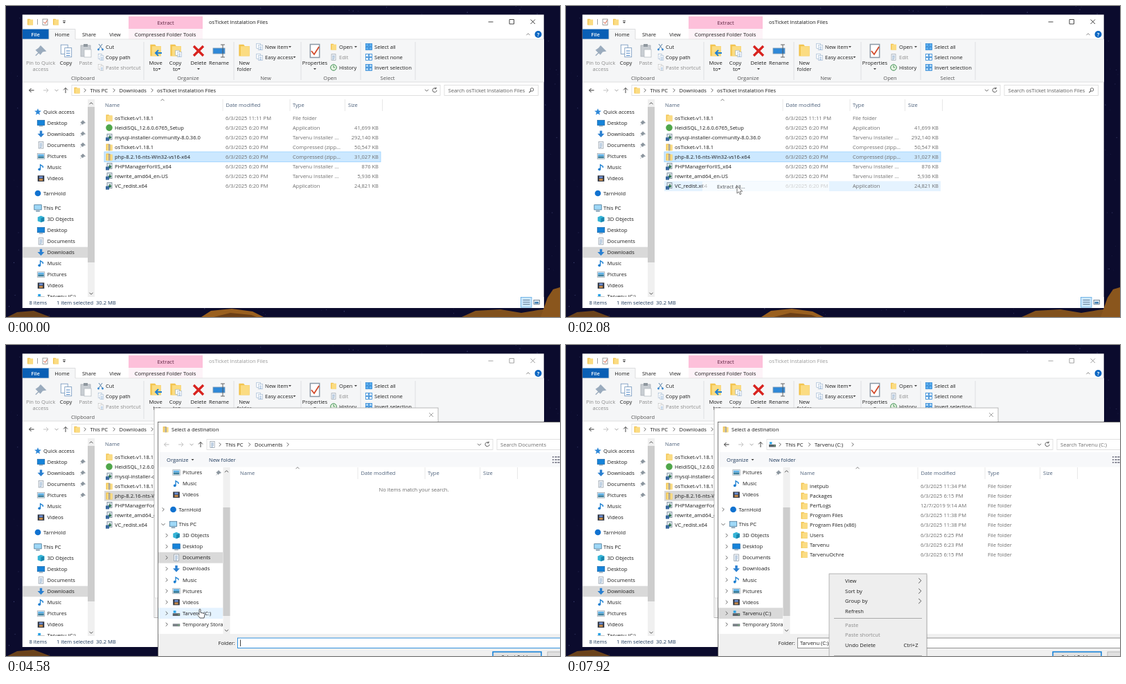
These frames come from a looping animation (800x450 px, 8 s). An HTML page:

```html
<!DOCTYPE html>
<html lang="en">
<head>
<meta charset="utf-8">
<title>Extracting a zip folder</title>
<style>
html, body { margin: 0; width: 100%; height: 100%; overflow: hidden; background: #0b0b2d; }
svg { display: block; width: 100vw; height: 100vh; font: 7.55px "Open Sans", "Noto Sans", sans-serif; }
</style>
</head>
<body>
<svg id="stage" viewBox="0 0 800 450"></svg>
<script>
const INK = '#1c1c1c', GREY = '#6d6d6d', BLUE = '#0078d7', LINE = '#d9d9d9';
const MID = 'text-anchor="middle"', END = 'text-anchor="end"';
const rowStep = 14.1;

// Drawing helpers: text is centred on y
const T = (x, y, s, fill = INK, more = '') => `<text x="${x}" y="${y + 2.6}" fill="${fill}" ${more}>${s}</text>`;
const R = (x, y, w, h, fill, stroke = 'none', more = '') =>
  `<rect x="${x}" y="${y}" width="${w}" height="${h}" fill="${fill}" stroke="${stroke}" stroke-width=".8" ${more}/>`;
const P = (d, stroke, fill = 'none', w = 0.9) => `<path d="${d}" stroke="${stroke}" fill="${fill}" stroke-width="${w}"/>`;
const C = (x, y, r, fill, more = '') => `<circle cx="${x}" cy="${y}" r="${r}" fill="${fill}" ${more}/>`;
const G = (id, s) => `<g id="${id}">${s}</g>`;
const at = (x, y, s, k = 1) => `<g transform="translate(${x} ${y}) scale(${k})">${s}</g>`;
const right = (x, y, c = '#555', k = 1) => P(`M${x - 1.3 * k} ${y - 2.6 * k}l${2.6 * k} ${2.6 * k}l${-2.6 * k} ${2.6 * k}`, c);
const down = (x, y, c = '#555') => P(`M${x - 2.5} ${y - 1.2}l2.5 2.5l2.5 -2.5`, c);
const up = (x, y, c = '#777') => P(`M${x - 2.5} ${y + 1.2}l2.5 -2.5l2.5 2.5`, c);
const tri = (x, y, c = '#444') => P(`M${x - 2} ${y - 1}h4l-2 2.2z`, 'none', c);
const cross = (x, y, id) => `<path id="${id}" d="M${x - 3} ${y - 3}l6 6m0 -6l-6 6" stroke="#333" stroke-width=".9"/>`;

const page = R(-3.5, -5, 7, 10, '#fff', '#8b98a5');
const folder = P('M-4.5 -4.8h4l1 1.2h4v8.6h-9z', 'none', '#f2c44f') + R(-3, -3.4, 7.4, 8.2, '#fbdc82');
const note = P('M-1 3V-4l4 2.5v2', '#1b7fd1', 'none', 1.4) + C(-2.4, 3, 2, '#1b7fd1');
const icon = {
  folder,
  zip: folder + R(-1, -4.5, 2.4, 9.5, '#8d8a80') + P('M.2 -4v9', '#eee', 'none', .6),
  desk: R(-5.5, -4, 11, 7.5, '#1684da', '#0f62a8') + P('M-3 5h6', '#5a7388'),
  down: P('M-1.8 -5h3.6v4.5h3.4L0 5l-5.2 -5.5h3.4z', 'none', '#2a7fd0'),
  doc: page + P('M-2 -2.5h4m-4 2h4m-4 2h4m-4 2h3', '#5c87b5', 'none', .8),
  pic: R(-5.5, -4, 11, 8, '#fff', '#9aa4ad') + R(-4.5, -3, 9, 3, '#5fb2e8') + R(-4.5, 0, 9, 3, '#3c7f9c'),
  music: note,
  video: R(-5, -4.5, 10, 9, '#2e3440') + R(-2.8, -3.4, 5.6, 3, '#6d8fd1') + R(-2.8, .4, 5.6, 3, '#c98d4b'),
  cube: P('M0 -5l5 2v6l-5 2l-5 -2v-6z', 'none', '#35b4d6') + P('M0 -1l5 -2v6l-5 2z', 'none', '#1a86ae'),
  pc: R(-5.5, -4.5, 11, 7.5, '#9fd8f7', '#3c6e91') + P('M-3 5h6', '#44708f', 'none', 1.2),
  drive: R(-5.5, 0, 11, 4, '#5b6268') + R(-4.5, -4, 4, 3.4, '#28a3e6') + R(2.5, 1.5, 2, 1, '#7be07b'),
  disk: R(-5.5, -1, 11, 4, '#7a8187') + R(2.5, .5, 2, 1, '#7be07b'),
  blob: C(0, 0, 4.6, '#1172d0'),
  green: C(0, 0, 4.8, '#4fa64a'),
  star: P('M0 -5l1.4 3.5l3.8 .2l-3 2.4l1 3.7L0 2.8l-3.2 2l1 -3.7l-3 -2.4l3.8 -.2z', 'none', '#2f88d8'),
  msi: R(-3, -5, 7, 8, '#dfe7ee', '#6f8290') + P('M1 -3v4m-2 -1.6l2 2l2 -2', '#1d6a3c', 'none', 1.4) + R(-5, 0, 5, 5, '#3b6aa0')
};
const I = (name, x, y, k = 1) => at(x, y, icon[name], k);
const pin = (x, y, k = 1, c = '#8b959e') => at(x, y, P('M0 -3.5l3.5 3.5l-2.2 .4l-1.5 2l-3 -3l2 -1.4zM-1.4 1.2l-2.2 2.2', c, c, .7), k);

// Parts shared by the main window and the folder picker
const navItem = (x, y, [name, ic, top]) => I(ic, x + (top ? 46 : 50.5), y, .95) + T(x + (top ? 54 : 59.5), y, name);
const navTools = (x, y, end, id) =>
  `<path id="${id}" d="M${x + 40.5} ${y}h-7m3 -3l-3 3l3 3" stroke="#333" fill="none"/>` +
  P(`M${x + 54} ${y}h7m-3 -3l3 3l-3 3`, '#bbb') + down(x + 73, y, '#999') +
  P(`M${x + 86} ${y + 4}v-7.5m-3 3l3 -3l3 3`, '#333') + R(x + 95, y - 7.5, end - x - 95, 15, '#fff', LINE) +
  down(end - 19.5, y) + P(`M${end - 6} ${y - 2.5}a3 3 0 1 0 1 2.5m-1 -4.5v2.3h-2.2`, '#444');
const heads = (x, y) =>
  [[143, 'Name'], [317.5, 'Date modified'], [414, 'Type'], [494, 'Size']].map(([a, s]) => T(x + a, y, s, '#4c607a')).join('') +
  [313, 410, 489.5, 543.5].map(a => P(`M${x + a} ${y - 8}v17`, '#e3e3e3', 'none', .8)).join('') + up(x + 226, y - 7);
const fileRow = (x, y, [name, ic, date, type, size = '']) =>
  I(ic, x + 149, y) + T(x + 157, y, name) + T(x + 317, y, date, GREY) + T(x + 414, y, type, GREY) + T(x + 538, y, size, GREY, END);
const button = (x, y, w, h, s, main) =>
  R(x, y, w, h, '#e1e1e1', main ? BLUE : '#adadad', main ? 'style="stroke-width:1.4"' : '') + T(x + w / 2, y + h / 2, s, INK, MID);
const scroll = (x, y0, y1, t0, t1) =>
  R(x, y0, 10, y1 - y0, '#f0f0f0') + R(x, t0, 10, t1 - t0, '#cdcdcd') + up(x + 5, y0 + 6, '#444') + down(x + 5, y1 - 5, '#444');
const menu = (x, y, w, hoverId, items, seps) =>
  R(x + 1, y + 2, w, 260, '#000', 'none', 'opacity=".1"') + R(x, y, w, 260, '#eee', '#a3a3a3') +
  R(x + 2, 0, w - 4, 14.6, '#f6f6f6', 'none', `id="${hoverId}"`) +
  items.map(([s, iy, arrow, c, more]) => T(x + 23, iy, s, c, more) + (arrow ? right(x + w - 10, iy, '#444', 1.4) : '')).join('') +
  seps.map(sy => P(`M${x + 7} ${sy}h${w - 14}`, '#989898', 'none', .8)).join('');

const ctxItems = [
  ['Open', 227.5, 0, INK, 'font-weight="700"'], ['Open in new window', 242], ['Extract All...', 261.5], ['Pin to Start', 276],
  ['Scan with Northgate Sentinel...', 291], ['Share', 305.5], ['Open with...', 320.5], ['Give access to', 340, 1],
  ['Restore previous versions', 354.5], ['Send to', 374, 1], ['Cut', 393.5], ['Copy', 408], ['Create shortcut', 427.5], ['Delete', 442]];
const viewItems = [
  ['View', 341, 1], ['Sort by', 356, 1], ['Group by', 370.5, 1], ['Refresh', 385.5], ['Paste', 405, 0, '#8a8a8a'],
  ['Paste shortcut', 419.5, 0, '#8a8a8a'], ['Undo Delete', 434]];
const eve = '6/3/2025 6:20 PM', wrap = 'Tarvenu Installer ...', zipped = 'Compressed (zipp...';
const files = [
  ['osTicket-v1.18.1', 'folder', '6/3/2025 11:11 PM', 'File folder'],
  ['HeidiSQL_12.6.0.6765_Setup', 'green', eve, 'Application', '41,699 KB'],
  ['mysql-installer-community-8.0.36.0', 'msi', eve, wrap, '292,140 KB'],
  ['osTicket-v1.18.1', 'zip', eve, zipped, '50,547 KB'],
  ['php-8.2.16-nts-Win32-vs16-x64', 'zip', eve, zipped, '31,027 KB'],
  ['PHPManagerForIIS_x64', 'msi', eve, wrap, '876 KB'],
  ['rewrite_amd64_en-US', 'msi', eve, wrap, '5,936 KB'],
  ['VC_redist.x64', 'msi', eve, 'Application', '24,821 KB']];
const driveFiles = [
  ['inetpub', '6/3/2025 11:34 PM'], ['Packages', '6/3/2025 6:15 PM'], ['PerfLogs', '12/7/2019 9:14 AM'],
  ['Program Files', '6/3/2025 11:38 PM'], ['Program Files (x86)', '6/3/2025 11:38 PM'], ['Users', '6/3/2025 6:25 PM'],
  ['Tarvenu', '6/3/2025 6:23 PM'], ['TarvenuOchre', '6/3/2025 6:15 PM']];
const rowYs = y0 => files.map((_, i) => y0 + i * rowStep);
const quick = [['Desktop', 'desk'], ['Downloads', 'down'], ['Documents', 'doc'], ['Pictures', 'pic'], ['Music', 'music'], ['Videos', 'video']];
const cloud = ['TarnHold', 'blob', 1], pc = ['This PC', 'pc', 1];
const places = [['3D Objects', 'cube'], ['Desktop', 'desk'], ['Documents', 'doc'], ['Downloads', 'down'], ['Music', 'music'],
  ['Pictures', 'pic'], ['Videos', 'video'], ['Tarvenu (C:)', 'drive']];
const placeYs = [...places, 0].map((_, i) => 275.5 + i * 16.1);

function backdrop() {
  let seed = 7, s = R(0, 0, 800, 450, '#0b0b2d');
  const rnd = () => (seed = seed * 16807 % 2147483647) / 2147483647;
  for (let i = 0; i < 700; i++)
    s += C((rnd() * 800).toFixed(1), (rnd() * 450).toFixed(1), (.25 + rnd() * .45).toFixed(2), '#7f88c4', `opacity="${(.15 + rnd() * .5).toFixed(2)}"`);
  return s + P('M2 450l14 -7l24 -2l24 9z', 'none', '#6b431b') +
    P('M282 450l14 -9l30 -3l30 4l16 8z', 'none', '#9a601f') + P('M300 450l24 -6l30 3l8 3z', 'none', '#6b3f16') +
    P('M658 450l20 -9l36 -2l30 5l24 -4l32 -4v14z', 'none', '#80501c') +
    P('M772 450l10 -28l8 -12l10 -3v43z', 'none', '#8a561d');
}

function ribbon() {
  const big = (x, a, b = '', c = INK) => T(x, 82, a, c, MID) + T(x, 91, b, c, MID);
  const small = (x, y, s, c = INK) => T(x, y, s, c);
  const sheets = (x, y, k, c = '#7a9cc0') => at(x, y, R(-7, -8, 9, 12, '#fff', c) + R(-2, -4, 9, 12, '#fff', c) + P('M0 0h5m-5 3h5m-5 3h5', '#4b84c4'), k);
  const grid = (y, c) => [0, 5].map(a => [0, 5].map(b => R(519.5 + a, y - 4.5 + b, 4, 4, c, '#2b86d6')).join('')).join('');
  return R(24, 48, 753, 62, '#f5f6f7') + P('M24 110h753', '#dadbdc') + P('M24 48h38m38 0h677', '#dadbdc', 'none', .7) +
    [199, 329, 426, 512, 591].map(x => P(`M${x} 52v55`, '#dcdddf')).join('') +
    [[111, 'Clipboard'], [263, 'Organize'], [375, 'New'], [468, 'Open'], [551, 'Select']].map(([x, s]) => T(x, 104, s, '#555', MID)).join('') +
    pin(50, 65, 2, '#9aabbd') + big(50, 'Pin to Quick', 'access', '#8b8b8b') +
    sheets(87, 65, 1.1) + big(86.5, 'Copy') +
    R(108, 57, 14, 16, '#c9ced3', '#a7adb3') + R(112, 55, 6, 4, '#8f989f') + R(113, 63, 10, 11, '#fff', '#b5bbc1') + big(115, 'Paste', '', '#8b8b8b') +
    P('M134 55l5 7m0 -7l-5 7', '#49759f') + C(133.5, 63, 1.4, '#2d83cf') + C(139.5, 63, 1.4, '#2d83cf') + small(144, 59, 'Cut') +
    sheets(137, 74, .55) + small(144, 74, 'Copy path') + sheets(137, 89, .55, '#aaa') + small(144, 89, 'Paste shortcut', '#8b8b8b') +
    I('folder', 216, 64, 1.7) + at(220, 68, P('M5 0H-4m4 -4l-4 4l4 4', '#1d7fd4', 'none', 2)) + big(216, 'Move', 'to') + tri(221.5, 91) +
    I('folder', 245, 64, 1.7) + sheets(249, 69, .6) + big(244.5, 'Copy', 'to') + tri(250, 91) +
    P('M271 58l14 14m0 -14l-14 14', '#d8231f', 'none', 3.4) + big(278, 'Delete') + tri(278, 91) +
    R(299, 61, 17, 8, '#2f88d8', '#7e98b0') + P('M313 56v18m-3 -18h6m-6 18h6', '#555') + big(307.5, 'Rename') +
    I('folder', 344, 64, 1.7) + big(344, 'New', 'folder') +
    sheets(366, 59, .6) + small(374, 59, 'New item') + tri(410, 59) + sheets(366, 74, .6) + small(374, 74, 'Easy access') + tri(416.5, 74) +
    at(446, 65, page, 1.9) + P('M441 65l4 5l7 -11', '#d34a2a', 'none', 1.8) + big(446, 'Properties') + tri(446, 91) +
    I('folder', 473, 59, .9) + small(481, 59, 'Open') + tri(505, 59) + I('doc', 473, 74, .85) + small(481, 74, 'Edit', '#8b8b8b') +
    C(473, 89, 4.3, '#e8f3e4', 'stroke="#3d9150"') + P('M473 86v3h2', '#3d9150') + small(481, 89, 'History') +
    grid(59, '#5db0f0') + small(532, 59, 'Select all') + grid(74, '#fff') + small(532, 74, 'Select none') +
    grid(89, '#a9d4f5') + small(532, 89, 'Invert selection');
}

function mainWindow() {
  const ys = rowYs(162), q = 153;
  return R(23.7, 12.5, 753, 424.5, '#fff') +
    R(177, 15, 107, 18, '#fdc0da') + R(177, 33, 107, 15, '#fdf3f8') + T(230.5, 24, 'Extract', '#5a2340', MID) +
    I('folder', 35, 23, .9) + P('M45.5 19v8m47 0', '#999') + R(53, 19, 7, 8.5, '#fff', '#888') + P('M54.5 23l2 2.5l3 -5', '#d34a2a') +
    I('folder', 72, 23, .9) + tri(84, 24) + P('M82 21.5h4', '#444') +
    `<g id="mainTitle">${T(293, 23, 'osTicket Instalation Files', 'inherit')}</g>` +
    `<g id="mainKeys" stroke="#333" fill="none" stroke-width=".9"><path d="M696.5 23h7M727 19.5h6.5v6.5h-6.5zM757.5 19.5l6.5 6.5m0 -6.5l-6.5 6.5"/></g>` +
    R(24, 33.5, 38, 14.5, '#0a5fb5') + T(42.5, 41, 'File', '#fff', MID + ' font-weight="600"') +
    ribbon() + R(62, 33.5, 38, 15, '#f5f6f7', 'none') + P('M62 48v-14.5h38v14.5', '#dadbdc') +
    T(81, 41, 'Home', INK, MID) + T(120, 41, 'Share', INK, MID) + T(157.5, 41, 'View', INK, MID) + T(230, 41, 'Compressed Folder Tools', INK, MID) +
    up(754, 41) + C(768.5, 41, 5, '#0a66c2') + T(768.5, 41, '?', '#fff', MID + ' font-weight="700"') +
    navTools(0, 122, 627, 'mainBack') + I('folder', 102.5, 122, .9) + right(114, 122) + T(121.5, 122, 'This PC') + right(156, 122) +
    T(163.5, 122, 'Downloads') + right(211, 122) + T(218, 122, 'osTicket Instalation Files') +
    R(633, 114.5, 135.5, 15, '#fff', LINE) + T(638.5, 122, 'Search osTicket Instalation Files', '#5c5c5c') +
    C(759.5, 121, 2.3, 'none', 'stroke="#555" stroke-width=".9"') + P('M758 122.7l-2.6 2.6', '#555', 'none', 1.1) +
    navItem(0, q, ['Quick access', 'star', 1]) + quick.map((n, i) => navItem(0, q + 16.1 * (i + 1), n) + (i < 4 ? pin(111, q + 16.1 * (i + 1)) : '')).join('') +
    navItem(0, 271, cloud) + navItem(0, 292, pc) + R(24, 348.7, 94, 15.6, LINE) +
    places.map((n, i) => navItem(0, 308.3 + 16.05 * i, n)).join('') + scroll(118, 135, 421, 146, 371) +
    heads(0, 143) + R(142, 0, 399, 14.6, '#e5f3ff', 'none', 'id="mainHover"') +
    R(142, ys[4] - 7.4, 399, 14.6, '#cce8ff', '#99d1ff', 'id="picked"') + files.map((f, i) => fileRow(0, ys[i], f)).join('') +
    R(24, 421, 752.7, 16, '#fff') + T(33.5, 429, '8 items', '#1e395b') + T(73, 429, '1 item selected', '#1e395b') + T(130, 429, '30.2 MB', '#1e395b') +
    R(743.5, 421.5, 15.5, 14.5, '#cce8ff', '#5aa9e0') + P('M746.5 425.5h10m-10 3h10m-10 3h10', '#5d7285') + R(762, 425.5, 8.5, 6, '#dbe7f0', '#5d7285') + R(763.5, 428, 5.5, 2.5, '#3f7fb5');
}

function wizard() {
  const dest = 'ers\\guest47\\Downloads\\osTicket Instalation Files\\php-8.2.16-nts-Win32-vs16-x64';
  return R(214, 91, 410, 303.5, '#fff', '#b4b4b4', 'id="wizFrame"') + cross(614, 101, 'wizX') +
    P('M228 121.5h-7.5m3 -3l-3 3l3 3', '#bbb') + I('zip', 244, 121.5, .9) + T(253, 121.5, 'Extract Compressed (Zipped) Folders') +
    T(240, 155.8, 'Select a Destination and Extract Files', '#003399', 'font-size="9.9"') + T(240, 179, 'Files will be extracted to this folder:') +
    R(240, 188, 293, 15, '#fff', '#7a7a7a') + T(529.5, 195.5, dest, INK, END) +
    R(539, 187.5, 57.5, 15.5, '#e1e1e1', '#adadad', 'id="browse"') + T(567.5, 195.3, 'Browse...', INK, MID) +
    R(240, 220.5, 8, 8, '#fff', '#333') + P('M241.6 224.5l2 2.2l3.4 -4.6', '#222', 'none', 1) + T(251, 224.5, 'Show extracted files when complete') +
    R(214.4, 366, 409.2, 28, '#f0f0f0') + P('M214.4 366h409', '#dfdfdf') +
    button(517, 374, 46, 13, 'Extract', 1) + button(570, 374, 46.5, 13, 'Cancel');
}

function picker() {
  const x = 195.5;
  const place = (ic, name) => I(ic, 298, 144, .9) + T(359, 144, name) + T(714, 144, 'Search ' + name, '#6d6d6d');
  return R(219.5, 111.5, 600, 360, '#fff', '#555') + I('zip', 230.5, 122, .85) + T(239, 122, 'Select a destination') +
    navTools(195, 144, 703, 'pickBack') + R(709, 136.5, 110, 15, '#fff', LINE) +
    right(309, 144) + T(317, 144, 'This PC') + right(351.5, 144) +
    R(220, 155, 580, 21.5, '#f7f8fa') + T(232, 166, 'Organize', '#1e395b') + tri(269.5, 166) + T(293, 166, 'New folder', '#1e395b') +
    [162, 166, 170].map(y => P(`M789 ${y}h2m1.5 0h3m1 0h3`, '#667', 'none', 1.6)).join('') +
    R(220, 0, 93, 15.8, LINE, 'none', 'id="pickSel"') + R(220, 0, 93, 15.8, '#e5f3ff', 'none', 'id="pickHover"') +
    quick.slice(3).map((n, i) => navItem(x, 184.5 + 16.1 * i, n)).join('') + pin(307, 185) +
    right(227, 238) + navItem(x, 238, cloud) + down(227, 259.5) + navItem(x, 259.5, pc) +
    [...places, ['Temporary Storage', 'disk']].map((n, i) => right(232, placeYs[i]) + navItem(x, placeYs[i], n)).join('') +
    R(313, 177, 487, 241, '#fff') + scroll(313.5, 177, 418, 235, 392) + heads(195, 185) +
    G('docs', place('doc', 'Documents') + right(407, 144) + T(589, 209, 'No items match your search.', GREY, MID)) +
    R(337, 0, 399, 14.6, '#e5f3ff', 'none', 'id="driveHover"') +
    G('drive', place('drive', 'Tarvenu (C:)') + right(414, 144) +
      driveFiles.map(([n, d], i) => fileRow(195, 204.4 + i * rowStep, [n, 'folder', d, 'File folder'])).join('')) +
    R(220, 418, 580, 32, '#f0f0f0') + T(306.5, 431.5, 'Folder:') + R(334.5, 424, 480, 14.5, '#fff', '#7a7a7a', 'id="field"') +
    G('caret', P('M338.5 426.5v9.5', '#111', 'none', .8)) + G('fieldText', T(338, 431.5, 'Tarvenu (C:)')) +
    button(703, 444, 70, 14, 'Select Folder', 1) + button(782, 444, 60, 14, '');
}

const pointers =
  G('arrow', P('M0 0v10.6l2.5 -2.3l1.7 4l1.8 -.8l-1.7 -3.9h3.4z', '#555', '#fff', .8)) +
  G('hand', P('M-1 1.2c0 -1.6 2 -1.6 2 0v4l5 1.2c1 .4 1 1.2 .9 2l-.9 4.6h-6l-3.6 -4.6c-.6 -1.2 .8 -1.8 1.6 -1l1 1z', '#333', '#fff', .8)) +
  G('busy', C(0, 0, 4.2, '#d6efff', 'stroke="#1a83d6" stroke-width="4.2"') + G('spin', P('M0 -4.2a4.2 4.2 0 0 1 4.2 4.2', '#4fb2f5', 'none', 2.6)));

stage.innerHTML = backdrop() + mainWindow() +
  G('ctx', menu(195, 217.5, 185.5, 'ctxHover', ctxItems, [252, 330, 364, 383.5, 418]) + R(202.5, 286, 9.5, 9.5, '#1668c1') +
    P('M203 303v5.5h7v-2m-5.5 -.5c.5 -3 3 -3.5 6 -3.5m-2 -2l2 2l-2 2', '#444')) +
  G('chosen', R(197, 254, 183, 15, '#fff', 'none', 'opacity=".85"') + T(218, 261.5, 'Extract All...')) +
  G('wizard', wizard()) + G('picker', picker()) +
  G('view', menu(380, 331, 141, 'viewHover', viewItems, [395.5, 449.5]) + T(508.5, 434, 'Ctrl+Z', INK, END)) +
  G('pointer', pointers);

const el = id => document.getElementById(id);
const set = (id, o) => { for (const k in o) el(id).setAttribute(k, o[k]); };
const show = (id, on) => set(id, { visibility: on ? 'inherit' : 'hidden' });

// Pointer stops: time, x, y
const path = [[80, 262, 462], [750, 195, 217], [1000, 195, 217], [1250, 215, 225], [1500, 215, 225], [1920, 247, 260.5], [2550, 247, 260.5],
  [3080, 555, 201.5], [3650, 555, 201.5], [4420, 280, 382], [5000, 280, 382], [5900, 380, 331], [6580, 380, 331], [7020, 425, 462]];
function pointerAt(t) {
  const i = path.findIndex(k => k[0] > t);
  if (i < 0) return path.at(-1).slice(1);
  const b = path[i], a = path[i - 1] || b;
  const u = b === a ? 0 : (t - a[0]) / (b[0] - a[0]), e = u * u * (3 - 2 * u);
  return [a[1] + (b[1] - a[1]) * e, a[2] + (b[2] - a[2]) * e];
}

function draw(t) {
  const [px, py] = pointerAt(t);
  const hover = (id, on, x0, x1, ys, pad = 7.3) => {
    const y = on && px > x0 && px < x1 ? ys.find(v => Math.abs(py - v) < 7.3) : undefined;
    show(id, y);
    if (y) set(id, { y: y - pad });
  };
  const ctx = t >= 900 && t < 2030, wiz = t >= 2500, pick = t >= 3500, inDrive = t >= 4900, view = t >= 6250;
  show('ctx', ctx);
  show('chosen', t >= 2030 && t < 2250);
  set('chosen', { opacity: Math.max(0, Math.min(1, 1 - (t - 2030) / 220)) });
  show('wizard', wiz);
  show('picker', pick);
  show('view', view);
  show('docs', pick && !inDrive);
  show('drive', inDrive);
  show('fieldText', inDrive);
  show('caret', pick && !inDrive && t % 1060 < 530);

  set('mainTitle', { fill: wiz ? '#999' : INK });
  set('mainKeys', { stroke: wiz ? '#999' : '#333' });
  set('picked', wiz ? { fill: LINE, stroke: 'none' } : { fill: '#cce8ff', stroke: '#99d1ff' });
  set('wizX', { stroke: pick ? '#999' : '#333' });
  set('wizFrame', { stroke: pick ? '#a8a8a8' : '#f0f0f0' });
  set('pickBack', { stroke: inDrive ? '#333' : '#bbb' });
  set('field', { stroke: inDrive ? '#7a7a7a' : BLUE });
  const chosenY = placeYs[inDrive ? 7 : 2];
  set('pickSel', { y: chosenY - 7.9 });
  const lit = !pick && px > 539 && px < 597 && py > 187 && py < 203;
  set('browse', lit ? { fill: '#a8cbee', stroke: '#2f7fc4' } : { fill: '#e1e1e1', stroke: '#adadad' });

  hover('mainHover', !ctx && !wiz, 142, 541, rowYs(162));
  hover('ctxHover', ctx, 195, 380, ctxItems.map(i => i[1]));
  hover('viewHover', view, 380, 521, viewItems.map(i => i[1]));
  hover('driveHover', inDrive && !view, 337, 736, rowYs(204.4));
  hover('pickHover', pick && !view, 220, 313, placeYs.filter(y => y !== chosenY), 7.9);

  const busy = t >= 3100 && t < 3500, hand = pick && !view && px < 313 && py > 268;
  set('pointer', { transform: `translate(${px.toFixed(2)} ${py.toFixed(2)})` });
  show('arrow', !busy && !hand);
  show('hand', hand);
  show('busy', busy);
  set('spin', { transform: `rotate(${t * .36 % 360})` });
}

const start = performance.now();
function frame(now) {
  draw(Math.max(0, now - start) % 8000);
  requestAnimationFrame(frame);
}
draw(0);
requestAnimationFrame(frame);
</script>
</body>
</html>
```
